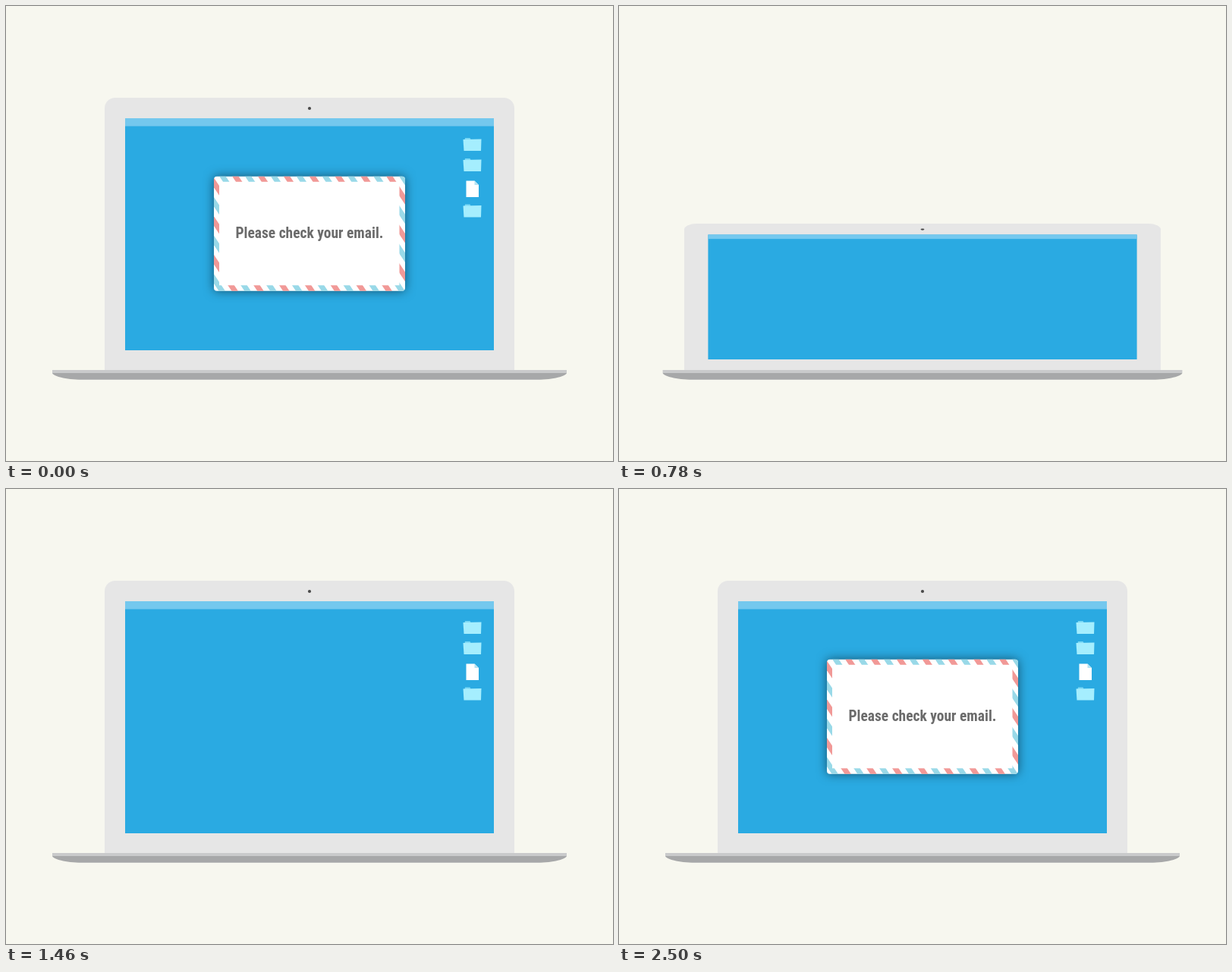
An HTML page with a canvas for the animation above (3.7 s loop, 800x600 px).

```html
<!DOCTYPE html>
<html lang="en">
<head>
<meta charset="utf-8">
<title>Check your email</title>
<style>
  html, body { margin: 0; height: 100%; overflow: hidden; background: #f7f7ef; }
  canvas { display: block; }
</style>
</head>
<body>
<canvas id="stage" width="800" height="600"></canvas>
<script>
const ctx = document.getElementById('stage').getContext('2d');
const LOOP = 3700, STEP = 40;
const FONT = '"Roboto Condensed", "Liberation Sans Narrow", Roboto, sans-serif';
const MESSAGE = 'Please check your email.';

const progress = (t, start, length) => Math.min(1, Math.max(0, (t - start) / length));
const backOut = (u, s) => 1 + (s + 1) * (u - 1) ** 3 + s * (u - 1) ** 2;

function rect(color, x, y, w, h) {
  ctx.fillStyle = color;
  ctx.fillRect(x, y, w, h);
}

function poly(color, ...points) {
  ctx.fillStyle = color;
  ctx.beginPath();
  for (const [x, y] of points) ctx.lineTo(x, y);
  ctx.fill();
}

function rounded(color, x, y, w, h, radii) {
  ctx.fillStyle = color;
  ctx.beginPath();
  ctx.roundRect(x, y, w, h, radii);
  ctx.fill();
}

// Runs draw in a moved, scaled and turned space
function within(x, y, sx, sy, angle, draw) {
  ctx.save();
  ctx.translate(x, y);
  ctx.rotate(angle);
  ctx.scale(sx, sy);
  draw();
  ctx.restore();
}

function base(t) {
  const scale = backOut(progress(t, 360, 456), 1.82);
  if (scale <= 0) return;
  within(400, 480, scale, 1, 0, () => {
    ctx.fillStyle = '#a7a8a9';
    ctx.beginPath();
    ctx.moveTo(-339, 4);
    ctx.bezierCurveTo(-338, 8, -322, 12.7, -300, 12.7);
    ctx.lineTo(300, 12.7);
    ctx.bezierCurveTo(322, 12.7, 338, 8, 339, 4);
    ctx.fill();
    rect('#c9cacb', -339, 0, 678, 4);
  });
}

function lid(t) {
  const sy = backOut(progress(t, 732, 320), 1.4);
  if (sy <= 0) return;
  const sx = 1 + 0.039 * (Math.max(0, 926 - t) / 66) ** 1.8;
  within(400, 480, sx, sy, 0, () => {
    rounded('#e6e6e6', -270, -359, 540, 359, [14, 14, 0, 0]);
    rect('#2aaae2', -243, -332, 486, 306);
    rect('#74c8ee', -243, -332, 486, 10.5);
    ctx.fillStyle = '#4a4a4a';
    ctx.beginPath();
    ctx.arc(0, -345, 2.1, 0, 7);
    ctx.fill();
  });
}

function folder() {
  poly('#78d7f5', [3, -9], [9.5, -9], [10.5, -7], [2.5, -6]);
  poly('#a5eefe', [0.5, -7], [24.5, -7.5], [24, 8], [1.5, 8]);
}

function page() {
  poly('#fff', [4.5, -10.5], [15.5, -10.5], [21, -5], [21, 11], [4.5, 11]);
  poly('#b5e3f3', [15.5, -10.5], [21, -5], [15.5, -5]);
}

function icons(t) {
  [[183, folder], [210, folder], [241, page], [270.5, folder]].forEach(([y, draw], i) => {
    const u = progress(t, 1130 + i * 67, 129);
    if (!u) return;
    ctx.globalAlpha = u;
    within(602 - 15 * (1 - u), y, 1, 1, 0, draw);
    ctx.globalAlpha = 1;
  });
}

function envelope(t) {
  const scale = Math.sin(progress(t, 1480, 340) * Math.PI / 2);
  if (!scale) return;
  const angle = -25.7 * (1 - scale) * Math.PI / 180;
  within(400, 300.3, scale, scale, angle, () => {
    ctx.shadowColor = 'rgba(0,0,0,.52)';
    ctx.shadowBlur = 14 * scale;
    rounded('#fff', -126, -75.5, 252, 151, 4);
    ctx.shadowColor = 'transparent';
    ctx.clip();
    ctx.lineWidth = 7;
    for (let k = -12; k <= 11; k++) {
      const y = 20 + 25.38 * k;
      ctx.strokeStyle = k % 2 ? '#99d9e8' : '#f19997';
      ctx.beginPath();
      ctx.moveTo(-140, y - 210);
      ctx.lineTo(140, y + 210);
      ctx.stroke();
    }
    rect('#fff', -119, -68.5, 237.5, 136.5);
  });
}

function message(t) {
  const alpha = progress(t, 1980, 520);
  if (!alpha) return;
  ctx.save();
  ctx.globalAlpha = alpha;
  ctx.fillStyle = '#6b6b6b';
  ctx.textAlign = 'center';
  ctx.fontStretch = 'condensed';
  ctx.font = `700 100px ${FONT}`;
  const size = 100 * 195 / ctx.measureText(MESSAGE).width;
  ctx.font = `700 ${size}px ${FONT}`;
  ctx.fillText(MESSAGE, 400, 298.8 + size * 0.36);
  ctx.restore();
}

function frame() {
  const now = performance.now() % LOOP;
  let t = Math.floor((now - 20) / STEP) * STEP + 20;
  if (t < 100) t = LOOP;
  rect('#f7f7ef', 0, 0, 800, 600);
  for (const draw of [lid, base, icons, envelope, message]) draw(t);
  requestAnimationFrame(frame);
}
frame();
</script>
</body>
</html>
```
